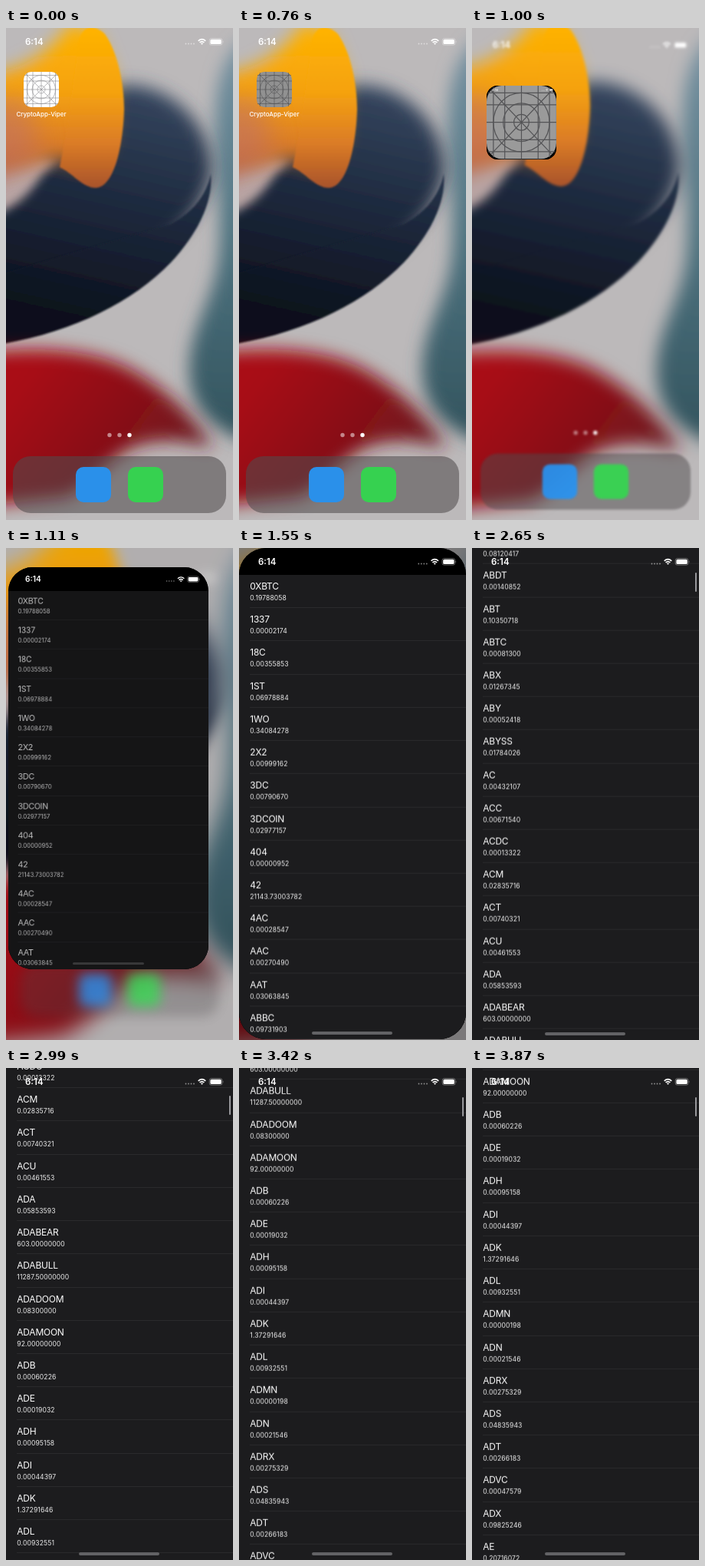
An HTML page for the animation above (3.96 s loop, 296 by 640 pixels).

```html
<!DOCTYPE html>
<html lang="en">
<head>
<meta charset="utf-8">
<style>
  html, body { margin: 0; width: 100%; height: 100%; overflow: hidden; background: #000; }
  body { font-family: Inter, Roboto, sans-serif; color: #fff; }
  #stage { position: relative; width: 296px; height: 640px; overflow: hidden; background: #bcb9ba; }
  #stage > *, .screen > svg { position: absolute; left: 0; top: 0; }
  svg { display: block; overflow: visible; }
  #app { overflow: hidden; background: #000; }
  .screen { position: absolute; width: 296px; height: 640px; overflow: hidden; background: #000; transform-origin: 0 0; }
  #list { position: absolute; top: 35px; width: 100%; will-change: transform; }
  .row { box-sizing: border-box; height: 43.22px; padding: 7px 0 0 14.3px; background: #1c1c1e; position: relative; }
  .row::after { content: ""; position: absolute; left: 14px; right: 0; bottom: 0; height: 1px; background: #2b2b2d; }
  .row b { display: block; font: 400 12px/16px Inter, Roboto, sans-serif; letter-spacing: -.02em; }
  .row span { display: block; margin-top: 1px; font-size: 8.6px; line-height: 12px; letter-spacing: .01em; color: #f0f0f0; }
  #thumb { position: absolute; left: 290.8px; width: 2.4px; height: 25px; border-radius: 2px; background: #98989c; }
  #bar { position: absolute; left: 32.1%; width: 35.5%; bottom: calc(6px * var(--k)); height: calc(3.8px * var(--k)); border-radius: 3px; background: #626265; }
  #splash { position: absolute; width: 100%; height: 100%; }
</style>
</head>
<body>
<div id="stage">
  <svg id="wall" width="296" height="640">
    <defs>
      <filter id="edge"><feGaussianBlur stdDeviation="1"/></filter>
      <filter id="soft" x="-30%" y="-30%" width="160%" height="160%"><feGaussianBlur stdDeviation="7"/></filter>
      <filter id="wide" x="-40%" y="-40%" width="180%" height="180%"><feGaussianBlur stdDeviation="11"/></filter>
      <filter id="haze" x="-60%" y="-60%" width="220%" height="220%"><feGaussianBlur stdDeviation="17"/></filter>
      <linearGradient id="teal" gradientUnits="userSpaceOnUse" x1="0" y1="30" x2="0" y2="530">
        <stop stop-color="#7490a0"/><stop offset=".45" stop-color="#507582"/><stop offset="1" stop-color="#33545e"/>
      </linearGradient>
      <linearGradient id="navy" gradientUnits="userSpaceOnUse" x1="190" y1="80" x2="120" y2="390">
        <stop stop-color="#35465f"/><stop offset=".45" stop-color="#1f2b40"/><stop offset="1" stop-color="#0b101b"/>
      </linearGradient>
      <linearGradient id="orange" gradientUnits="userSpaceOnUse" x1="0" y1="0" x2="0" y2="208">
        <stop stop-color="#ffb300"/><stop offset=".4" stop-color="#f5a20f"/><stop offset=".72" stop-color="#db7c27"/><stop offset="1" stop-color="#a8532a"/>
      </linearGradient>
      <linearGradient id="red" gradientUnits="userSpaceOnUse" x1="40" y1="430" x2="225" y2="570">
        <stop stop-color="#a90d17"/><stop offset=".55" stop-color="#8a0d14"/><stop offset="1" stop-color="#6f1f25"/>
      </linearGradient>
      <g id="status" fill="#fff">
        <text x="25" y="22" font-size="11.5" font-weight="600">6:14</text>
        <path d="M234.5 20.5h12" stroke="#fff" stroke-opacity=".5" stroke-width="1.8" stroke-linecap="round" stroke-dasharray="0 3.5"/>
        <path d="M250.7 16.8Q255.5 12.4 260.3 16.8M252.6 18.9Q255.5 16.3 258.4 18.9" fill="none" stroke="#fff" stroke-width="1.6"/>
        <path d="M253.9 20.1Q255.5 18.8 257.1 20.1L255.5 21.8Z"/>
        <rect x="265.2" y="13.6" width="16.8" height="8.6" rx="2.6" fill="none" stroke="#fff" stroke-opacity=".5" stroke-width=".7"/>
        <rect x="266.4" y="14.8" width="14.4" height="6.2" rx="1.6"/>
        <path d="M282.8 16.5q1.3 1.4 0 2.8z" opacity=".6"/>
      </g>
      <g id="grid">
        <rect width="46" height="46" rx="10" fill="#fff"/>
        <g fill="none" stroke="#8b8b8f" stroke-width=".6">
          <path d="M4.5 1V45M12 0V46M23 0V46M34 0V46M41.5 1V45M1 4.5H45M0 12H46M0 23H46M0 34H46M1 41.5H45M3 3L43 43M43 3L3 43"/>
          <circle cx="23" cy="23" r="5"/><circle cx="23" cy="23" r="12"/><circle cx="23" cy="23" r="18.5"/>
        </g>
      </g>
    </defs>
    <rect x="-80" y="-80" width="456" height="800" fill="#bcb9ba"/>
    <path filter="url(#wide)" fill="url(#teal)" d="M340 0C289 15 276 60 273 110C270 170 282 220 278 290C274 350 241 385 239 440C238 490 264 528 340 545Z"/>
    <path filter="url(#wide)" fill="url(#navy)" d="M-40 250L60 150L140 76C200 64 267 115 268 185C262 240 205 298 105 350L-40 380Z"/>
    <path filter="url(#edge)" fill="url(#navy)" d="M-40 416C70 404 160 362 215 305C252 265 270 225 267 190Q258 232 215 255L-40 330Z"/>
    <path filter="url(#soft)" fill="#b9a6a5" d="M-40 150L70 170Q50 183 36 206Q12 238 -40 252Z"/>
    <path filter="url(#wide)" fill="url(#orange)" d="M-40 62C10 58 50 44 86 -10L120 10L140 60L136 150L108 184L62 170Q25 182 -40 196Z"/>
    <path filter="url(#haze)" fill="#bd706c" opacity=".55" d="M-40 90L30 90L45 165L-40 215Z"/>
    <path filter="url(#edge)" fill="url(#orange)" d="M92 40C92 -8 115 -6 129 8C146 32 154 75 154 105C153 150 142 207 117 208C100 208 86 188 70 181L80 130Z"/>
    <path filter="url(#wide)" fill="url(#red)" d="M-60 426C30 412 105 417 155 440C205 465 248 508 270 546C235 538 200 531 165 546C135 560 115 592 80 610L-60 625Z"/>
  </svg>

  <svg id="home" width="296" height="640">
    <rect id="dock" x="9" y="557" width="278" height="74" rx="23" fill="#504b4e" fill-opacity=".56"/>
    <use href="#status"/>
    <g id="icon">
      <use id="tile" href="#grid" x="23" y="57"/>
      <text x="46" y="115" text-anchor="middle" font-size="8" font-weight="500" fill="#fff">CryptoApp-Viper</text>
    </g>
    <g fill="#fff"><circle cx="135" cy="529.5" r="2.7" opacity=".5"/><circle cx="148" cy="529.5" r="2.7" opacity=".5"/><circle cx="161" cy="529.5" r="2.7"/></g>
    <rect x="91" y="571" width="46" height="46" rx="10" fill="#2a90ea"/>
    <rect x="159" y="571" width="46" height="46" rx="10" fill="#36d150"/>
  </svg>

  <div id="app">
    <div class="screen" id="screen">
      <div id="list"></div>
      <svg width="296" height="640"><use href="#status"/></svg>
      <div id="thumb"></div>
    </div>
    <svg id="splash" viewBox="0 0 46 46" preserveAspectRatio="none"><use href="#grid"/></svg>
    <div id="bar"></div>
  </div>
</div>

<script>
const coins = `0XBTC 0.19788058,1337 0.00002174,18C 0.00355853,1ST 0.06978884,1WO 0.34084278,2X2 0.00999162,
3DC 0.00790670,3DCOIN 0.02977157,404 0.00000952,42 21143.73003782,4AC 0.00028547,AAC 0.00270490,AAT 0.03063845,
ABBC 0.09731903,ABC 0.08120417,ABDT 0.00140852,ABT 0.10350718,ABTC 0.00081300,ABX 0.01267345,ABY 0.00052418,
ABYSS 0.01784026,AC 0.00432107,ACC 0.00671540,ACDC 0.00013322,ACM 0.02835716,ACT 0.00740321,ACU 0.00461553,
ADA 0.05853593,ADABEAR 603.00000000,ADABULL 11287.50000000,ADADOOM 0.08300000,ADAMOON 92.00000000,ADB 0.00060226,
ADE 0.00019032,ADH 0.00095158,ADI 0.00044397,ADK 1.37291646,ADL 0.00932551,ADMN 0.00000198,ADN 0.00021546,
ADRX 0.00275329,ADS 0.04835943,ADT 0.00266183,ADVC 0.00047579,ADX 0.09825246,AE 0.20716072`;

const LOOP = 3960, PRESS = 760, OPEN = 900, SCROLL = 2310, RELEASE = 2450;
const ticks = [0, PRESS, OPEN, 1010, 1110, 1220, 1340, 1450, 1550, SCROLL, 2410, 2530, 2650, 2770,
  2890, 2990, 3110, 3210, 3320, 3420, 3530, 3640, 3760, 3870];

const $ = id => document.getElementById(id);
const clamp = x => Math.min(1, Math.max(0, x));
const mix = (a, b, p) => a + (b - a) * p;

$('list').innerHTML = coins.split(',').map(c => {
  const [name, price] = c.trim().split(' ');
  return `<div class="row"><b>${name}</b><span>${price}</span></div>`;
}).join('');

// Critically damped spring, already under way when the window appears
function opening(t) {
  if (t < OPEN) return 0;
  if (t >= SCROLL) return 1;
  const x = (t - 840) * .0128;
  return 1 - (1 + x) * Math.exp(-x);
}

// Finger drag, then exponential deceleration
function scrolled(t) {
  if (t < SCROLL) return 0;
  if (t < RELEASE) return mix(4, 280, ((t - SCROLL) / (RELEASE - SCROLL)) ** 1.18);
  return 1440 - 1160 * Math.exp((RELEASE - t) / 500);
}

function drawHome(t, p) {
  $('tile').style.filter = t >= PRESS ? 'brightness(.57)' : 'none';
  $('icon').style.opacity = t < OPEN ? 1 : 0;
  $('wall').style.transform = `scale(${1 + .1 * p})`;
  $('wall').style.filter = p ? `blur(${9 * p}px) brightness(${1 - .35 * p ** 12})` : 'none';
  $('home').style.transform = `scale(${1 - .08 * p})`;
  $('home').style.filter = p ? `blur(${9 * p}px)` : 'none';
  $('home').style.opacity = 1 - .2 * p;
  $('dock').style.opacity = 1 - .4 * p;
}

function drawApp(t, p) {
  const app = $('app').style, w = mix(46, 296, p), h = mix(46, 640, p ** 1.45), k = w / 296;
  app.display = t < OPEN ? 'none' : 'block';
  app.left = mix(46, 148, p) - w / 2 + 'px';
  app.top = mix(80, 320, p) - h / 2 + 'px';
  app.width = w + 'px';
  app.height = h + 'px';
  app.borderRadius = t < SCROLL ? mix(10, 35, p) + 'px' : 0;
  app.setProperty('--k', k);
  $('screen').style.transform = `scale(${k})`;
  $('splash').style.opacity = clamp(1 - 2.2 * p);
  $('bar').style.opacity = clamp((t - 950) / 350);

  const s = scrolled(t);
  $('list').style.opacity = clamp((t - 950) / 210);
  $('list').style.transform = `translateY(${-s}px)`;
  $('thumb').style.display = t < SCROLL ? 'none' : 'block';
  $('thumb').style.top = 27 + s * .0083 + 'px';
}

const start = performance.now();
function frame() {
  const now = (performance.now() - start) % LOOP;
  const t = ticks.findLast(x => x <= now);
  const p = opening(t);
  drawHome(t, p);
  drawApp(t, p);
  requestAnimationFrame(frame);
}
frame();
</script>
</body>
</html>
```
